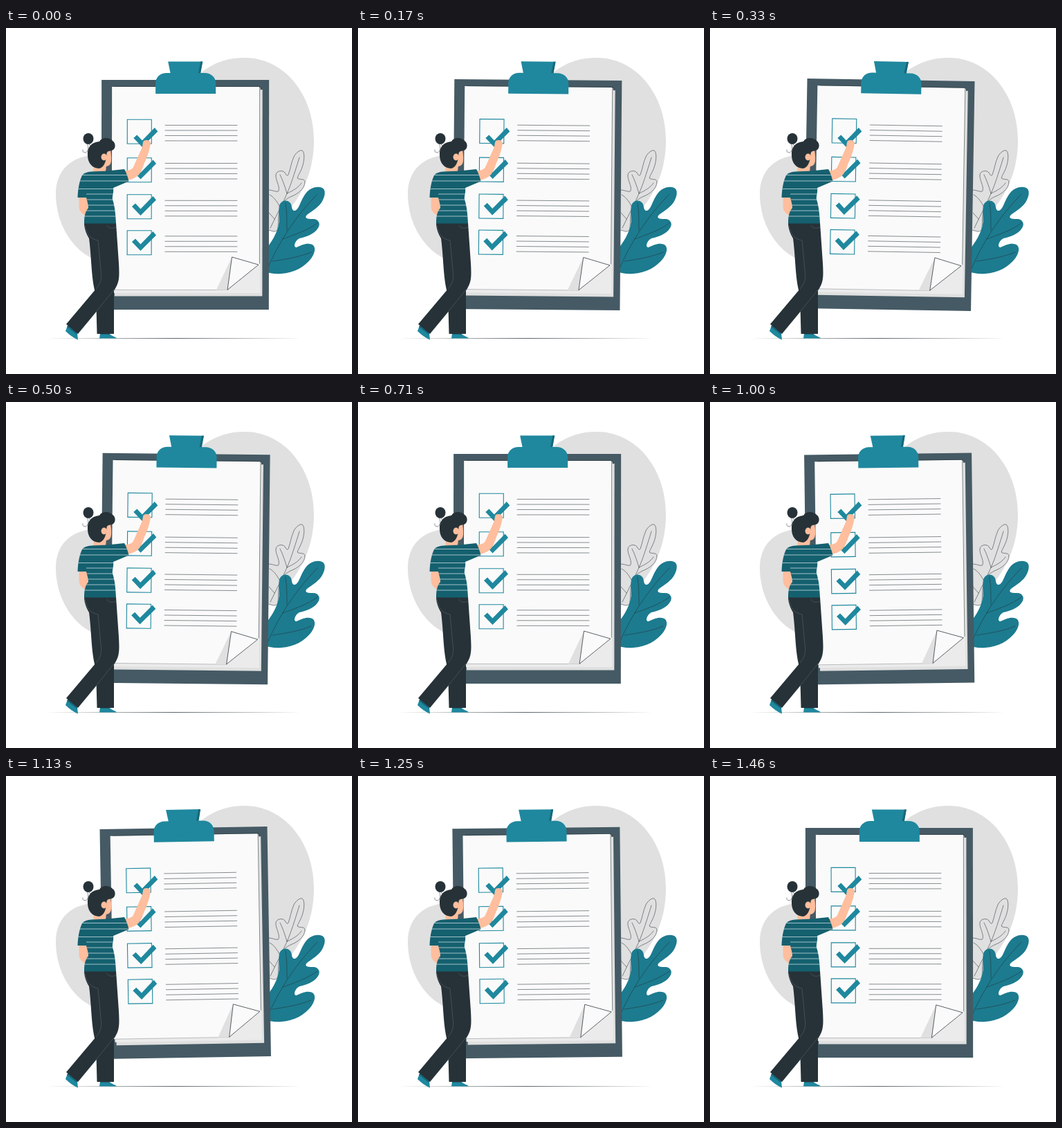
An HTML page that plays this animation: 500x500 px, repeating every 1.5 s.

```html
<!DOCTYPE html>
<html lang="en">
<head>
<meta charset="utf-8">
<title>Checklist</title>
<style>
  html, body { margin: 0; width: 100%; height: 100%; overflow: hidden; background: #fff; }
  svg { display: block; width: 100%; height: 100%; }
  .teal { fill: #1f889e; }
  .dark { fill: #263238; }
  .skin { fill: #ffbe9d; }
  .grey { fill: #e0e0e0; }
  .thin { fill: none; stroke: #263238; stroke-width: .55; stroke-linecap: round; stroke-linejoin: round; }
  .box { fill: none; stroke: #1f889e; stroke-width: 1.1; }
  .seam { fill: none; stroke: #55626a; stroke-width: .6; }
</style>
</head>
<body>
<svg viewBox="0 0 500 500">
  <defs>
    <path id="tick" d="M182 258L187 253.500L194.500 261.500L212.500 243L217 248.500L194.500 271Z"/>
    <path id="shirt" d="M123 207.500L147 206.500L171 204C174 209 176 215 177.500 221.500L155 231C156 238 153 243 154 248C156 254 158 262 159 282.500H113C113 273 114 266 119 260C119 254 117 250 116 245H103.500C104 233 106 221 110 213C113 209 118 208 123 207.500Z"/>
    <clipPath id="shirtClip"><use href="#shirt"/></clipPath>
  </defs>

  <path class="grey" d="M72 240C72 205 95 184 133 183L270 75C298 47 325 43 345 43C402 43 445 96 445 162C445 213 424 255 380 292L142 338C105 333 72 290 72 240Z"/>
  <path class="dark" d="M57 448.400L243 448L428 448.400L243 448.800Z"/>

  <g id="paleLeaf">
    <path class="thin" style="fill:#e0e0e0" d="M376 234C385 233 393 239 394 235C396 228 389 219 390 212C391 206 400 205 403 209C405 212 406 215 408 212C411 204 412 195 416 186C419 180 425 176 428 177C432 180 431 191 429 198C427 206 422 213 421 217C425 220 431 217 432 222C432 232 422 240 411 244C403 248 397 254 396 262C392 272 395 291 391 293C387 296 381 291 376 292Z"/>
    <path class="thin" d="M382 289C393 266 404 246 411 227C416 213 420 200 424 187M406 239C415 235 422 231 427 224M406 239C403 229 400 220 396 212M396 259C392 251 387 244 381 241M388 276L380 267"/>
  </g>

  <path fill="#1c7b8f" d="M374 352V322C384 309 392 296 394 284C396 274 393 266 395 257C397 249 406 247 411 253C414 257 412 264 417 264C424 263 425 249 434 238C440 231 449 228 457 231C463 234 461 244 456 252C450 261 439 266 434 271C431 276 438 276 445 276C452 277 455 283 451 289C445 299 432 302 424 304C418 307 414 317 420 317C427 313 438 309 444 314C448 318 446 326 441 333C432 345 416 354 398 355C388 356 380 354 374 352Z"/>
  <path class="thin" d="M376 352C391 317 412 279 450 240M385 337C405 334 424 331 441 324M400 305C416 299 435 293 450 282M406 293C406 279 406 266 404 253"/>

  <g id="board">
    <path fill="#455a64" d="M138 75H380V407H138Z"/>
    <path fill="#e0e0e0" d="M157 89H370.500V387.500H157Z"/>
    <path fill="#ebebeb" d="M155 86H367.500V383H155Z"/>
    <path fill="#fafafa" d="M153 85H366V342L320 378.500H153Z"/>
    <path class="thin" d="M157 84.500H366.500V340M368.500 86V89"/>
    <path class="thin" style="stroke:#8b9194" d="M155 378.500H321"/>
    <path class="grey" d="M326.500 331L304 378.500H321Z"/>
    <path class="thin" style="fill:#fafafa;stroke-width:.75" d="M327 331L365 342L320.500 378Z"/>
    <path class="teal" d="M234 48.500H284L280 68H238Z"/>
    <path fill="#17687a" d="M281 48.500H284L281 66H277.500Z"/>
    <path class="teal" d="M216 95V80C216 71 223 65 232 65H287C296 65 303 71 303 80V95Z"/>
    <g id="rows"></g>
  </g>

  <use href="#tick" class="teal" x="2.300" y="-99"/>

  <g id="woman">
    <path class="skin" d="M105.500 244H117C120 253 119 263 117 271C111 270 106 266 105.500 258Z"/>
    <path class="skin" d="M171 206C177 206 182 205 184 201L196 174C198 170 197 166 199 163C203 161 208 162 209 166C208 174 205 184 200 195C197 203 195 210 190 214C186 217 181 219 176 220Z"/>
    <path class="teal" d="M89 430L103 441L104 450.500C98 448 91 443 86 438ZM136 441H149C151 445 157 445 160 448.500H135Z"/>
    <path fill="#17687a" d="M90 429L103 440L102 443L88 432ZM136 440H149L150 443H136Z"/>
    <path class="dark" d="M113 282H151L156 370V442H131.500L130 385C123 365 124 335 120 304C117 299 113 291 113 282Z"/>
    <path class="dark" d="M127 282H159L163 340C164 360 164 367 157 378L104 442L87 428L130 377C137 370 139 365 137 350Z"/>
    <path class="seam" d="M114 285C117 299 122 305 133 307L137 350C139 364 136 370 130 377M146 285C148 290 154 290 159 288M156 378L131 409"/>
    <path class="skin" d="M127 198H145L144 208H126Z"/>
    <use href="#shirt" fill="#15606f"/>
    <path clip-path="url(#shirtClip)" fill="none" stroke="#c5dade" stroke-width=".8" d="M103 212.500H180M103 221H180M103 232.500H157M116 240H160M110 248H160M110 256H160M110 264H160M110 272H160"/>
    <path class="skin" d="M140 176H151C152 183 153 191 151 196C149 200 144 201 140 199Z"/>
    <ellipse class="dark" cx="119" cy="160" rx="7.500" ry="8"/>
    <path class="thin" d="M117 167C120 171 119 179 115 180C112 180 110 178 111 176M120 168L123 172"/>
    <path class="dark" d="M118 184C117 173 123 165 135 164C138 158 149 157 154 163C159 166 159 175 153 177C150 178 147 177 145.500 181C145 190 143 201 135 203C124 203 118 194 118 184Z"/>
    <ellipse class="skin" cx="141.700" cy="186.500" rx="4.200" ry="5"/>
  </g>
</svg>
<script>
  const PERIOD = 1500, FPS = 24;
  const board = document.getElementById('board');

  // Each row: checkbox top, optional tick offset, first text line.
  const rows = [[132.3, null, 140.5], [187.8, -52.5, 195.5], [240.8, 0, 249.3], [292.8, 51, 300.8]];
  document.getElementById('rows').innerHTML = rows.map(([top, tickY, textY]) => {
    const tick = tickY === null ? '' : `<use href="#tick" class="teal" y="${tickY}"/>`;
    const lines = [0, 1, 2, 3].map(i => `M230 ${textY + i * 7.5}H334`).join('');
    return `<rect class="box" x="175.200" y="${top}" width="35" height="35"/>${tick}<path class="thin" d="${lines}"/>`;
  }).join('');

  // Linear sway: 0 -> 1 -> -1 -> 0 degrees over one period.
  function sway(p) {
    return p < .25 ? 4 * p : p < .75 ? 2 - 4 * p : 4 * p - 4;
  }

  const start = performance.now();
  function draw(now) {
    const t = Math.max(0, now - start) % PERIOD;
    const step = Math.floor((t + 4) / 1000 * FPS);
    const phase = (step + .5) * 1000 / FPS / PERIOD % 1;
    board.setAttribute('transform', `rotate(${sway(phase)} 259 227.5)`);
    requestAnimationFrame(draw);
  }
  draw(start);
</script>
</body>
</html>
```
